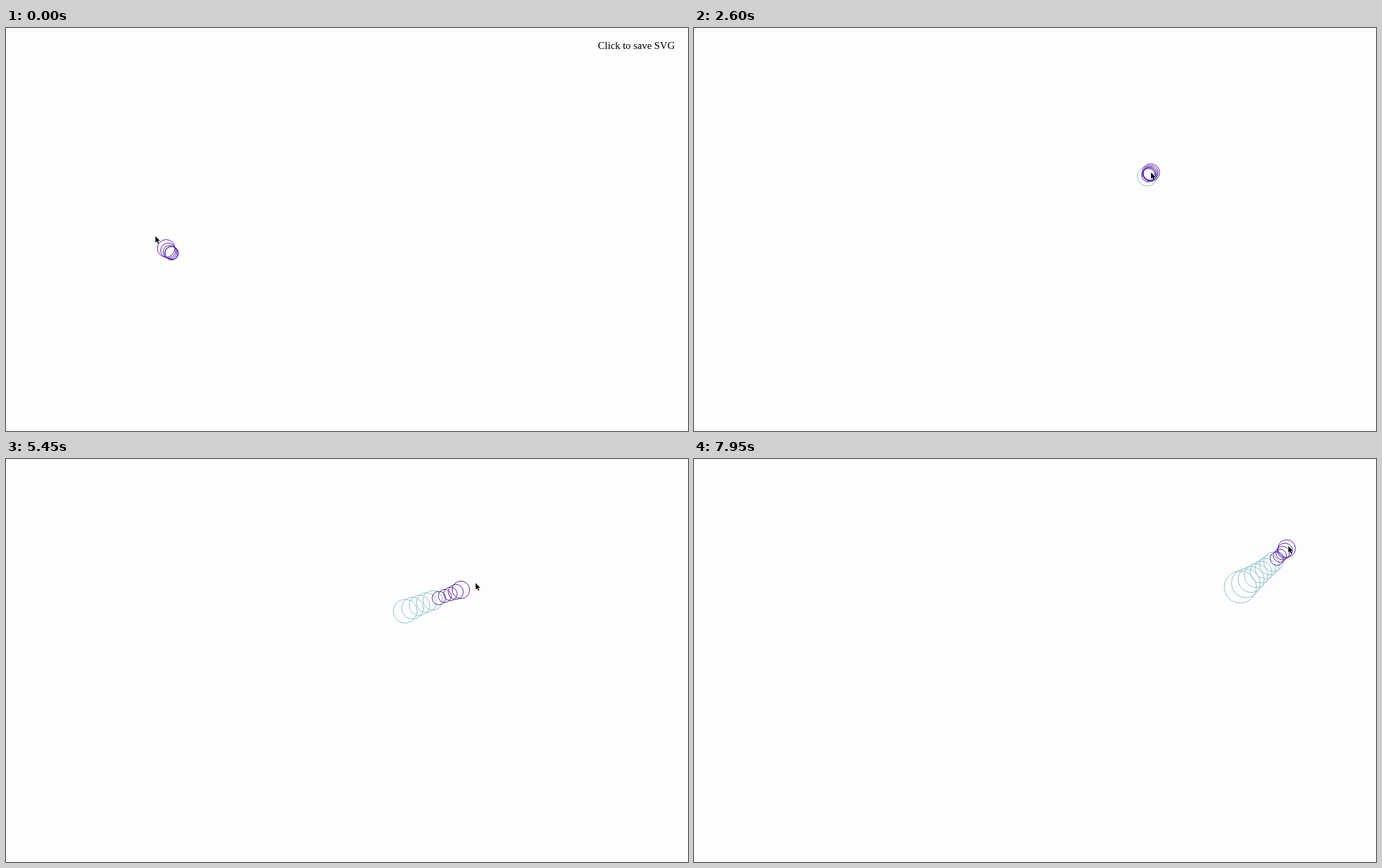
Recreate the animation shown at these times as an HTML page. Size 973 by 576 pixels, loop 8000 ms.

```html
<!DOCTYPE html>
<html lang="en">
<head>
<meta charset="utf-8">
<title>Trailing circles</title>
<style>
  html, body { margin: 0; width: 100%; height: 100%; overflow: hidden; background: #fdfdfd; }
  svg { display: block; width: 973px; height: 576px; }
  circle { fill: none; stroke: #8fc3cb; }
  circle.core { stroke: #5a26ae; }
  text { font: 14.7px "Liberation Serif", "Times New Roman", serif; }
</style>
</head>
<body>
<svg viewBox="0 0 973 576">
  <text id="hint" x="844.5" y="30">Click to save SVG</text>
  <g id="trail"></g>
  <path id="pointer" d="M0 0V9.3L2.1 7.3 3.7 10.9 5.2 10.2 3.6 6.7H6.5Z" stroke="#fff" stroke-width=".8" paint-order="stroke"/>
</svg>
<script>
const LOOP = 8000, STEP = 50;
const DELAY = 20;  // each circle repeats the one ahead of it this much later
const LEAD = 70;   // the pointer runs ahead of the first circle
const CORE = 5;

// A circle joins the tail at each click; the first click hides the hint
const clicks = [1450, 2700, 2850, 3000, 4650, 5750, 6600, 7500];

// Turning points and rests of the first circle: time, x, y
const route = [
  [-80, 236.5, 322], [0, 228.5, 315], [90, 211.5, 292],
  [450, 350, 193], [820, 498.5, 138.5], [930, 509, 137.5], [1450, 509, 137.5],
  [1960, 570, 284], [2500, 646.5, 212], [2620, 652, 206.5], [3120, 635, 217],
  [3540, 359.5, 320.5], [3700, 297.5, 345], [3790, 287.5, 349.5], [4820, 287.5, 349.5],
  [5270, 569.5, 217.5], [5450, 649, 187], [5530, 670.5, 177], [5690, 670.5, 177],
  [5950, 600, 152], [6150, 442.5, 188], [6350, 368, 214], [6420, 333, 245],
  [6600, 313, 305], [7130, 480, 365],
  [7710, 779.5, 183], [7950, 845.5, 128], [8020, 848, 124.5]
];

const radius = i => i < CORE
  ? 9.3 + 0.36 * (i - 3) ** 2
  : 14 + 0.18 * (i - CORE) ** 2;

function slope(i, axis) {
  const a = route[i], b = route[i + 1];
  return a && b ? (b[axis] - a[axis]) / (b[0] - a[0]) : 0;
}

// Mean of the neighbouring slopes, limited so that rests never overshoot
function tangent(i, axis) {
  const a = slope(i - 1, axis), b = slope(i, axis);
  if (a * b <= 0) return 0;
  const p = Math.abs(a), q = Math.abs(b);
  return Math.sign(a) * Math.min((p + q) / 2, 3 * p, 3 * q);
}

function position(t, axis) {
  const last = route.length - 1;
  const time = Math.min(Math.max(t, route[0][0]), route[last][0]);
  const i = Math.max(0, route.findIndex(key => key[0] >= time) - 1);
  const a = route[i], b = route[i + 1], span = b[0] - a[0];
  const u = (time - a[0]) / span, v = 1 - u;
  return v * v * (1 + 2 * u) * a[axis] + u * u * (1 + 2 * v) * b[axis]
    + span * u * v * (v * tangent(i, axis) - u * tangent(i + 1, axis));
}

const place = (el, t) =>
  el.setAttribute('transform', `translate(${position(t, 1)} ${position(t, 2)})`);
const show = (el, on) => { el.style.display = on ? '' : 'none'; };

const trail = document.getElementById('trail');
const hint = document.getElementById('hint');
const pointer = document.getElementById('pointer');

const circles = Array.from({ length: CORE + clicks.length }, (_, i) => {
  const el = document.createElementNS(trail.namespaceURI, 'circle');
  el.setAttribute('r', radius(i));
  el.classList.toggle('core', i < CORE);
  trail.prepend(el);
  return el;
});

function draw(t) {
  circles.forEach((el, i) => {
    show(el, i < CORE || t >= clicks[i - CORE]);
    place(el, t - i * DELAY);
  });
  place(pointer, t + LEAD);
  show(hint, t < clicks[0]);
}

const start = performance.now();
function tick() {
  const t = (performance.now() - start) % LOOP;
  draw(Math.floor(t / STEP) * STEP);
  requestAnimationFrame(tick);
}
tick();
</script>
</body>
</html>
```
